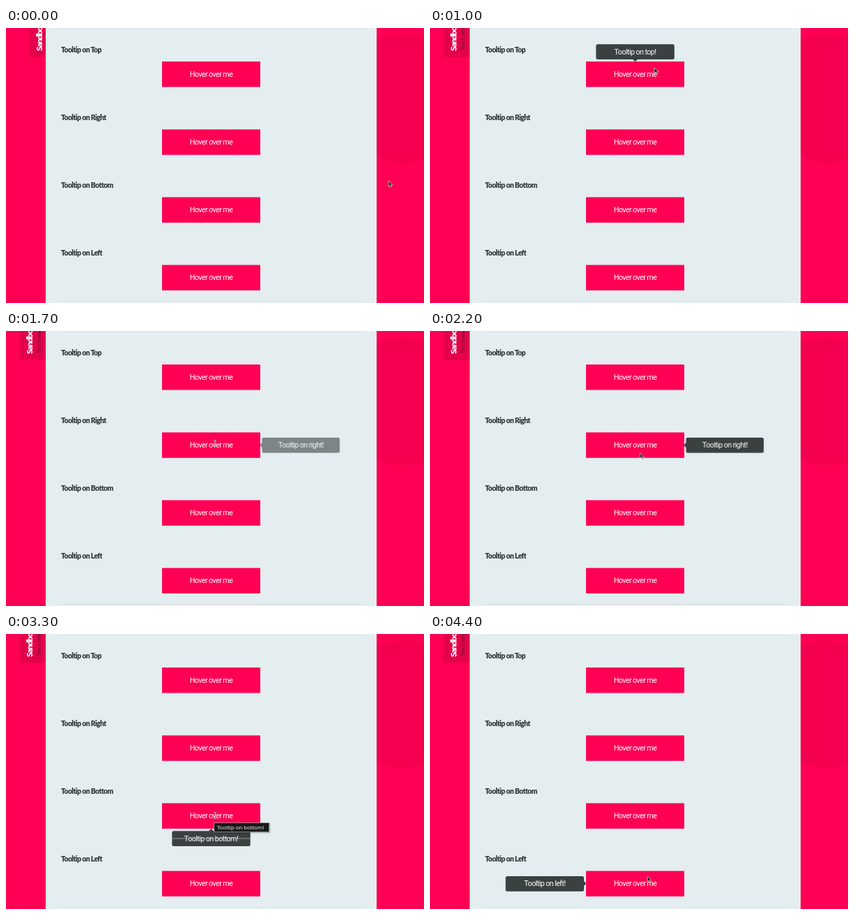
These frames come from a looping animation (600 by 394 pixels, 4.5 s). An HTML page:

```html
<!DOCTYPE html>
<html lang="en">
<head>
<meta charset="utf-8">
<title>Tooltip directions</title>
<style>
html, body { margin: 0; width: 100%; height: 100%; overflow: hidden; background: #ff0054; }
svg { display: block; width: 600px; height: 394px; }

.heading { font: 900 10.4px Lato, sans-serif; letter-spacing: -.6px; fill: #30383a; }
.label { font: 400 10.8px Roboto, sans-serif; letter-spacing: -.6px; fill: #fff; text-anchor: middle; }
.side-title { font: 900 12px Lato, sans-serif; letter-spacing: -1px; fill: #fff; }
.side-note { font: 400 7px Lato, sans-serif; fill: #5b1730; }
.native text { font: 400 7.8px "Open Sans", sans-serif; fill: #fff; }
.button { fill: #ff0054; }
.tip { fill: #3b4041; }

.side, .tip, .native, .seam, .cursor, .arrow, .beam {
  animation: 4500ms step-end infinite;
}
.side { animation-name: slide; }
.cursor { animation-name: move; }
.arrow { animation-name: arrow; }
.beam { animation-name: beam; }
.native { animation-name: native; }
.seam { animation-name: seam; }

/* Each tooltip grows out of the centre of its button. */
.top { transform-origin: 294.5px 66px; animation-name: top; }
.right { transform-origin: 294.5px 163.5px; animation-name: right; }
.bottom { transform-origin: 294.5px 260.5px; animation-name: bottom; }
.left { transform-origin: 294.5px 357.5px; animation-name: left; }

@keyframes slide {
  0% { transform: translateX(0); animation-timing-function: steps(5); }
  11.11%, 100% { transform: translateX(-14px); }
}

@keyframes top {
  0% { transform: scale(.59); opacity: 0; }
  15.55% { transform: scale(.59); opacity: .12; }
  17.77% { transform: scale(.9); opacity: .4; }
  20% { transform: scale(1); opacity: .75; }
  22.22% { transform: scale(1); opacity: 1; }
  28.88% { transform: scale(.935); opacity: .6; }
  31.11% { transform: scale(.7); opacity: .2; }
  33.33%, 100% { transform: scale(.59); opacity: 0; }
}
@keyframes right {
  0% { transform: scale(.59); opacity: 0; }
  33.33% { transform: scale(.59); opacity: .1; }
  35.55% { transform: scale(.9); opacity: .3; }
  37.77% { transform: scale(1); opacity: .6; }
  40% { transform: scale(1.01); opacity: .85; }
  42.22% { transform: scale(1); opacity: 1; }
  51.11% { transform: scale(.935); opacity: .6; }
  53.33% { transform: scale(.7); opacity: .2; }
  55.55%, 100% { transform: scale(.59); opacity: 0; }
}
@keyframes bottom {
  0% { transform: scale(.59); opacity: 0; }
  60% { transform: scale(.59); opacity: .1; }
  62.22% { transform: scale(.9); opacity: .3; }
  64.44% { transform: scale(1); opacity: .6; }
  66.66% { transform: scale(1); opacity: .85; }
  68.88% { transform: scale(1); opacity: 1; }
  77.77% { transform: scale(.935); opacity: .6; }
  80% { transform: scale(.7); opacity: .2; }
  82.22%, 100% { transform: scale(.59); opacity: 0; }
}
@keyframes left {
  0% { transform: scale(.59); opacity: 0; }
  91.11% { transform: scale(.59); opacity: .12; }
  93.33% { transform: scale(.9); opacity: .4; }
  95.55% { transform: scale(1); opacity: .75; }
  97.77%, 100% { transform: scale(1); opacity: 1; }
}

@keyframes native {
  0% { opacity: 0; }
  73.33% { opacity: 1; }
  77.77%, 100% { opacity: 0; }
}
@keyframes seam {
  0% { opacity: 0; }
  68.88% { opacity: 1; }
  77.77%, 100% { opacity: 0; }
}

@keyframes move {
  0% { transform: translate(549px, 219px); animation-timing-function: steps(2); }
  4.44% { transform: translate(505px, 186px); animation-timing-function: steps(3); }
  11.11% { transform: translate(338px, 70px); }
  13.33%, 24.44% { transform: translate(322px, 57px); animation-timing-function: steps(3); }
  31.11% { transform: translate(305px, 135px); animation-timing-function: steps(2); }
  35.55%, 46.66% { transform: translate(300px, 161px); animation-timing-function: steps(2); }
  51.11% { transform: translate(303px, 188px); animation-timing-function: steps(4); }
  60% { transform: translate(310px, 247px); animation-timing-function: steps(2); }
  64.44%, 73.33% { transform: translate(300px, 260px); animation-timing-function: steps(4); }
  82.22% { transform: translate(345px, 312px); }
  84.44% { transform: translate(348px, 316px); animation-timing-function: steps(2); }
  88.88% { transform: translate(332px, 342px); animation-timing-function: steps(4); }
  97.77%, 100% { transform: translate(312px, 347px); }
}
@keyframes arrow {
  0%, 48.88%, 75.55%, 100% { opacity: 1; }
  35.55%, 64.44% { opacity: 0; }
}
@keyframes beam {
  0%, 48.88%, 75.55%, 100% { opacity: 0; }
  35.55%, 64.44% { opacity: 1; }
}
</style>
</head>
<body>
<svg viewBox="0 0 600 394">
  <rect width="600" height="394" fill="#ff0054"/>
  <circle cx="570" cy="100.5" r="92" fill="#f50051"/>

  <g class="side">
    <rect x="33" y="-2" width="60" height="43.5" fill="#e5004c"/>
    <text class="side-title" transform="translate(51.5 33) rotate(-90)">Sandbox</text>
    <text class="side-note" transform="translate(63.5 32) rotate(-90)">This is where you work</text>
  </g>

  <rect x="57" width="475" height="394" fill="#e4edef"/>
  <path d="M79 1H512M79 391.5H512" stroke="#d9e2e4"/>

  <g class="heading">
    <text x="79" y="35">Tooltip on Top</text>
    <text x="79" y="132">Tooltip on Right</text>
    <text x="79" y="229">Tooltip on Bottom</text>
    <text x="79" y="326">Tooltip on Left</text>
  </g>

  <g class="button">
    <rect x="224" y="48" width="141" height="36.5"/>
    <rect x="224" y="145.3" width="141" height="36.5"/>
    <rect x="224" y="242.4" width="141" height="36.5"/>
    <rect x="224" y="339.5" width="141" height="36.5"/>
  </g>
  <g class="label">
    <text x="294.5" y="70">Hover over me</text>
    <text x="294.5" y="167">Hover over me</text>
    <text x="294.5" y="264">Hover over me</text>
    <text x="294.5" y="361">Hover over me</text>
  </g>

  <g class="tip top">
    <rect x="238.3" y="23.3" width="112.5" height="21.7" rx="2.5"/>
    <path d="M290.5 44.5h8l-4 3.7z"/>
    <text class="label" x="294.5" y="37.8">Tooltip on top!</text>
  </g>
  <g class="tip right">
    <rect x="367.5" y="152.8" width="111.5" height="21.7" rx="2.5"/>
    <path d="M368 159.5v8l-3.5-4z"/>
    <text class="label" x="423.3" y="167">Tooltip on right!</text>
  </g>
  <g class="tip bottom">
    <rect x="238.3" y="282.3" width="112.5" height="21.7" rx="2.5"/>
    <path d="M290.5 282.7h8l-4-3.7z"/>
    <text class="label" x="294.5" y="296.8">Tooltip on bottom!</text>
    <path class="seam" d="M238.3 293H350.8" stroke="#aeb4b5" stroke-width=".8"/>
  </g>
  <g class="tip left">
    <rect x="108.5" y="347" width="112.5" height="21.7" rx="2.5"/>
    <path d="M220.5 353.5v8l3.7-4z"/>
    <text class="label" x="164.7" y="361">Tooltip on left!</text>
  </g>

  <g class="native">
    <rect x="299.5" y="271" width="80" height="14.5" rx="1" fill="#000" opacity=".22"/>
    <rect x="298.8" y="270.3" width="79" height="13.5" fill="#191919" stroke="#c9cdce" stroke-width=".6"/>
    <text x="303" y="279.6">Tooltip on bottom!</text>
  </g>

  <g class="cursor">
    <path class="arrow" d="M0 0V8L1.9 6.3 3.2 9 4.6 8.4 3.4 5.8H6Z" fill="#222" stroke="#fff" stroke-width=".6"/>
    <g class="beam" fill="none">
      <path d="M-1.8-4.5Q0-4.5 0-3V3Q0 4.5-1.8 4.5M1.8-4.5Q0-4.5 0-3M0 3Q0 4.5 1.8 4.5" stroke="#fff" stroke-width="1.5" opacity=".6"/>
      <path d="M-1.8-4.5Q0-4.5 0-3V3Q0 4.5-1.8 4.5M1.8-4.5Q0-4.5 0-3M0 3Q0 4.5 1.8 4.5" stroke="#777" stroke-width=".7"/>
    </g>
  </g>
</svg>
</body>
</html>
```
